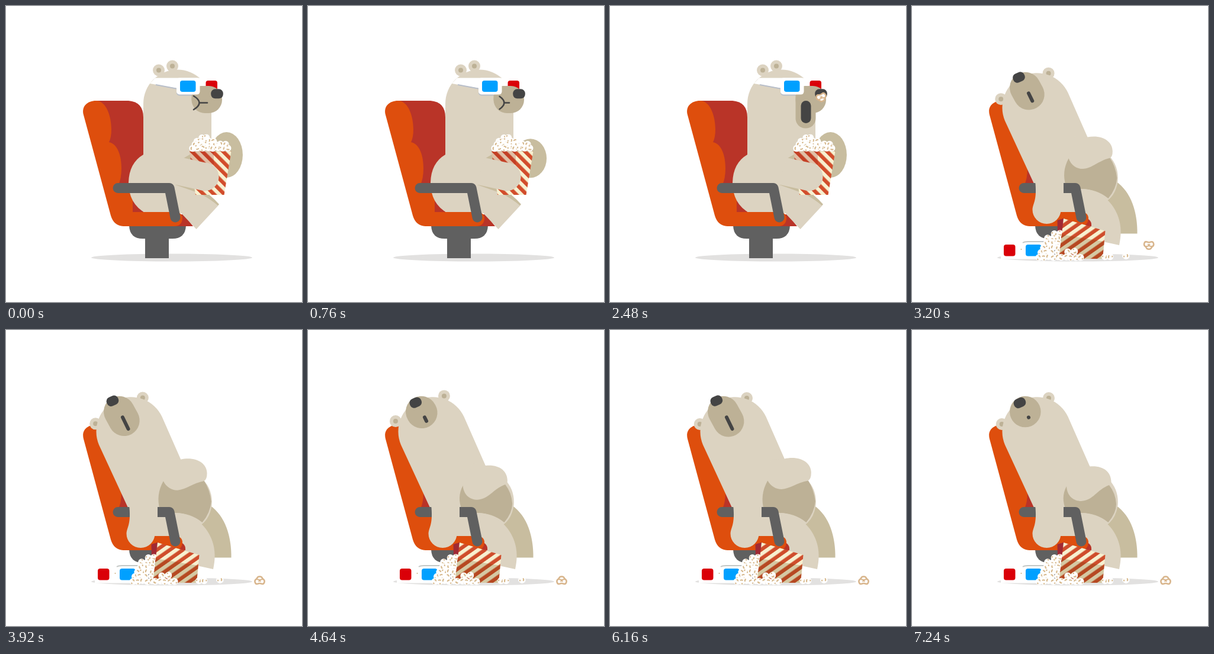
Write an HTML page that moves like this. It is 500x500 px and loops after 7.28 s.

```html
<!DOCTYPE html>
<html lang="en">
<head>
<meta charset="utf-8">
<title>Bear at the movies</title>
<style>
html, body { margin: 0; width: 100%; height: 100%; overflow: hidden; background: #fff; }
svg { display: block; width: 100vw; height: 100vh; }
.fur { fill: #dcd3c1; }
.far { fill: #c8bd9f; }
.dark { fill: #bdb196; }
.red { fill: #b93428; }
.orange { fill: #de4e0d; }
.grey { fill: #606060; }
.ink { fill: #444; }
.arm { fill: none; stroke: #606060; stroke-width: 17; stroke-linecap: round; stroke-linejoin: round; }
.line { fill: none; stroke: #444; stroke-width: 2.6; stroke-linecap: round; }
</style>
</head>
<body>
<svg viewBox="0 0 500 500">
  <defs>
    <pattern id="stripes" width="12.4" height="12.4" patternUnits="userSpaceOnUse" patternTransform="translate(310 246) rotate(-45)">
      <rect width="13" height="13" fill="#f7f0d0"/><rect width="6.3" height="13" fill="#d24d2c"/>
    </pattern>
    <pattern id="tilted" width="12.6" height="12.6" patternUnits="userSpaceOnUse" patternTransform="translate(256 359) rotate(55)">
      <rect width="13" height="13" fill="#cf4d2c"/><rect width="6.3" height="13" fill="#f7f0d0"/>
    </pattern>
    <g id="chair">
      <ellipse cx="280" cy="425" rx="136" ry="6.5" fill="#e2e1e0"/>
      <path class="grey" d="M235 385h40v41h-40zM208 371H304Q303 393 281 393H231Q209 393 208 371Z"/>
      <path class="red" d="M152 160H207Q232 162 232 188V352H180Z"/>
      <path class="orange" d="M152 160C170 160 178 188 178 208Q178 222 174 230C189 233 195 254 195 274Q195 291 190 302L214 308V348H260V372H198Q182 371 177 354L131 184C127 169 138 160 152 160Z"/>
    </g>
    <path id="seat" class="orange" d="M212 348H286Q298 349 298 359Q297 372 284 372H212Z"/>
    <path id="rest" class="arm" d="M189 307.500H276L286 357"/>
    <g id="ear"><circle class="fur" r="10"/><circle class="dark" r="4"/></g>
    <rect id="nose" class="ink" x="-10.300" y="-8" width="20.600" height="16" rx="7.200"/>
    <g id="pretzel" fill="none" stroke="#d8b58c" stroke-width="2.500" stroke-linecap="round">
      <path fill="#fff" d="M0 6.500C-5 7 -3.500 3 -6.200 2C-10 -1 -7.500 -7 -3.500 -5.800Q0 -4 3.500 -5.800C7.500 -7 10 -1 6.200 2C3.500 3 5 7 0 6.500Z"/>
      <path d="M-4.500 1.800Q0 2 1.300 -1.500M4.500 1.800Q0 2 -1.300 -1.500" stroke-width="2"/>
    </g>
  </defs>

  <g id="awake">
    <use href="#chair"/>
    <path class="red" d="M270 352H300L316 372H270Z"/>
    <path class="far" d="M283 301L325 306Q345 318 360 335L350 345Z"/>
    <path class="fur" d="M232 165A57.500 57.500 0 0 1 347 165V290L283 301Q312 311 328 317Q345 326 358 337L360 335.500L321.500 377L296 350H236Q207 334 207 298Q208 265 232 251Z"/>
    <use href="#ear" x="258" y="108.500"/><use href="#ear" x="281" y="101.500"/>
    <path fill="#fff" d="M252 121.500H347V150H327V139H289L243 131Z"/>
    <path d="M253 133L290 140" stroke="#b9bfca" stroke-width="2"/>
    <rect x="288" y="124" width="38.500" height="27.500" rx="5" fill="#b9bfca"/>
    <rect x="288" y="121.500" width="39.500" height="28" rx="5" fill="#fff"/>
    <rect x="337.500" y="126" width="19.500" height="19" rx="4" fill="#da0008"/>
    <path class="fur" d="M326.500 150H347V170H326.500Z"/>
    <rect class="dark" x="313.500" y="135" width="51.500" height="46" rx="22.500"/>
    <rect class="dark" id="jaw" x="313.500" y="135" width="34" rx="16.500"/>
    <path fill="#fff" d="M313 134H327.500V144Q327.500 149.500 322 149.500H313Z"/>
    <rect x="294" y="126" width="26.500" height="19" rx="4" fill="#00a0ff"/>
    <path class="line" id="smile"/>
    <rect class="ink" id="mouth" x="322.500" y="160" width="17" rx="8.500"/>
    <use href="#nose" x="356.500" y="148.300"/>
    <path class="far" d="M300 257L312 250V264Z"/>
    <ellipse class="far" id="hand"/>
    <use href="#pretzel" id="snack"/>
    <path fill="url(#stripes)" d="M310 245.500H380.500L368.500 319H320Z"/>
    <path fill="#8e1010" opacity=".22" d="M310 245.500H351V268H313Z"/>
    <g id="heap"></g>
    <path class="fur" d="M283 301L300 256.500L336 264.500A24 24 0 0 1 335 312.500Z"/>
    <use href="#seat"/><use href="#rest"/>
  </g>

  <g id="asleep">
    <use href="#chair"/>
    <path class="far" d="M344 296C371 314 381 350 380.500 384.500H340L325 310Z"/>
    <use href="#ear" id="earL"/><use href="#ear" id="earR"/>
    <path class="fur" d="M157 194A58.300 58.300 0 0 1 263.500 146.600L302 234L332 252Q350 270 347.500 297Q344 318 331 328L300 348H230L206 300Z"/>
    <path class="dark" id="belly"/>
    <path class="fur" d="M256 348V309H285C323 308 364 348 350 404L318 397L290 368V348Z"/>
    <path class="fur" id="lobe"/>
    <path id="snout" fill="none" stroke="#bdb196" stroke-width="52.500" stroke-linecap="round"/>
    <use href="#nose" id="noseUp"/>
    <path id="snore" fill="none" stroke="#444" stroke-width="6" stroke-linecap="round"/>
    <path class="red" d="M285 360H298Q304 364 303 372H285Z"/>
    <use href="#seat"/><use href="#rest"/>
    <path class="fur" d="M204 290H256V316Q247 330 251.500 344A24 24 0 0 1 203.500 344C204 333 211 330 208.500 300Z"/>
    <path fill="#fff" d="M150 398H222V427.500H150Z"/>
    <rect x="155" y="403" width="19.500" height="19.500" rx="4" fill="#da0008"/>
    <rect x="192" y="403" width="26.500" height="19.500" rx="4" fill="#00a0ff"/>
    <path d="M187 400Q190 398 196 398H226" fill="none" stroke="#c4c8c6" stroke-width="2"/>
    <circle cx="184.500" cy="411" r="1" fill="#cdb083"/>
    <path fill="#a02a34" d="M245.500 362L257 358.500L252 394L246 385Z"/>
    <g id="spillBack"></g>
    <path fill="url(#tilted)" d="M256 359L326.500 380L322 427H248Z"/>
    <path fill="#5a3c00" opacity=".22" d="M253 386L325 398L322 427H248Z"/>
    <g id="spillFront"></g>
    <use href="#pretzel" id="dropped"/>
  </g>
</svg>
<script>
const LOOP = 7280, BITE = 640, NAP = 2560, BREATH = 2360, INHALE = 1060;
const el = id => document.getElementById(id);
const set = (id, attrs) => { for (const k in attrs) el(id).setAttribute(k, attrs[k]); };
const show = (id, on) => el(id).style.display = on ? '' : 'none';
const mix = (a, b, k) => a + (b - a) * k;
const ramp = (t, a, b) => Math.min(1, Math.max(0, (t - a) / (b - a)));
const ease = (t, a, b) => .5 - .5 * Math.cos(Math.PI * ramp(t, a, b));

let seed = 7;
const rnd = () => (seed = seed * 16807 % 2147483647) / 2147483647;

function puff(x, y) {
  const arc = '<path d="M-3 .5Q-2.500 -2.500 .5 -2.500M2 3.200L4 1.500" fill="none" stroke="#d6b88c" stroke-width="2"/>';
  return `<g transform="translate(${x} ${y}) rotate(${rnd() * 360})"><circle r="5.800" fill="#fff"/>${arc}</g>`;
}
// Fills rows of kernels; each row is [y, left, right].
function pile(rows) {
  return rows.map(([y, l, r]) => {
    const n = Math.max(1, Math.round((r - l) / 8.5));
    return Array.from({ length: n + 1 }, (_, i) => puff(mix(l, r, i / n) + rnd() * 2 - 1, y + rnd() * 2 - 1)).join('');
  }).join('');
}
el('heap').innerHTML = pile([[222, 332, 339], [228, 323, 350], [234, 319, 371], [240, 315, 375]]);
el('spillBack').innerHTML = pile([[384, 241, 249], [392, 229, 247], [400, 228, 248], [408, 223, 246], [416, 217, 246], [424, 215, 246]]);
el('spillFront').innerHTML = pile([[415, 263, 275], [424, 253, 284], [423, 325, 335], [422, 361, 361]]);

function eat(t) {
  const u = t % BITE;
  const low = u < 360 ? ease(u, 0, 220) + .25 * ease(u, 250, 350) : 1.25 * (1 - ease(u, 360, 500));
  set('hand', { cx: mix(372.5, 378, low), cy: mix(251.5, 261.5, low), rx: 27.4, ry: mix(38.5, 29, low) });

  const open = ease(u, 400, 510) * (1 - ease(u, 600, 640));
  const chew = .5 - .5 * Math.cos(u / 240 * Math.PI);
  set('jaw', { height: 38 + 33.5 * open });
  set('mouth', { height: 38 * open });
  show('mouth', open > .05);
  show('smile', open <= .05);
  const x = mix(317, 330, chew), mid = mix(326.5, 336, chew), dy = mix(11.5, 10, chew);
  set('smile', { d: `M${x} ${163.5 - dy}Q${2 * mid - x} 163.500 ${x} ${163.5 + dy}M${mid} 163.500H340` });

  let px, py;
  if (u < 400) {
    const k = ease(u, 150, 240);
    px = mix(374, 385, k); py = mix(242, 230, k);
  } else if (u < 560) {
    const k = ramp(u, 400, 560);
    px = mix(385, 357.5, k); py = mix(230, 154.5, 1 - (1 - k) ** 2);
  } else {
    const k = ramp(u, 560, 620);
    px = mix(357.5, 331, k); py = mix(154.5, 180, k * k);
  }
  show('snack', u > 150 && u < 615);
  set('snack', { transform: `translate(${px} ${py}) rotate(${180 + Math.max(0, u - 400)})` });
}

// Falls, bounces twice and rolls to rest.
function dropPretzel(s) {
  const ground = 423;
  const hop = (a, b, h) => 4 * h * ramp(s, a, b) * (1 - ramp(s, a, b));
  const y = mix(160, ground, ramp(s, 0, 470) ** 2) - hop(470, 780, 19) - hop(780, 960, 7);
  const roll = 1 - (1 - ramp(s, 640, 1100)) ** 2, back = ease(s, 1080, 1230);
  const x = mix(360, 400, ramp(s, 0, 640)) + 31 * roll - 2.5 * back;
  const turn = mix(-200, 0, ramp(s, 0, 640)) + 195 * roll - 15 * back;
  set('dropped', { transform: `translate(${x} ${y}) rotate(${turn})` });
}

function sleep(s) {
  const c = s % BREATH;
  const b = c < INHALE ? ease(c, 0, INHALE) : 1 - ease(c, INHALE, BREATH);
  const gape = c < INHALE ? b : 1 - ease(c, BREATH - 720, BREATH);
  const e = s > BREATH + INHALE ? 1 : b;
  set('earL', { transform: `translate(${mix(147.5, 151.7, e)} ${mix(153.5, 159, e)})` });
  set('earR', { transform: `translate(${mix(229.8, 231, e)} ${mix(111, 115, e)})` });
  set('snout', { d: `M191.300 138l${9.3 * b} ${17 * b + .01}` });
  set('noseUp', { transform: `translate(${mix(182, 179.7, b)} ${mix(123, 119.3, b)}) rotate(-24)` });
  set('snore', { d: `M197 147.500l${9.5 * gape} ${19.5 * gape + .01}` });

  const p = (x0, y0, x1, y1) => `${mix(x0, x1, b)} ${mix(y0, y1, b)} `;
  const left = p(261, 264, 266.5, 254), right = p(333, 262, 335, 254);
  set('lobe', { d: `M${left}C${p(262, 281, 272, 263)}${p(273, 289, 281, 268)}${p(286, 289, 290, 268)}`
    + `C${p(306, 288, 304, 267)}${p(312, 270, 316, 257)}${right}`
    + `Q${p(336.5, 262, 340, 251)}${p(336.5, 256, 340, 240)}C${p(336, 240, 340, 222)}${p(324, 229, 319, 211)}${p(301, 230.5, 294, 217)}`
    + `L${p(280, 226, 272, 218)}Z` });
  set('belly', { d: `M${left}Q${p(251, 283, 253, 278)}260 304L285 309Q312 309 331.500 325Q345 309 ${p(345, 294, 347, 289)}`
    + `Q${p(344, 276, 344, 268)}${right}L${p(300, 250, 300, 245)}Z` });
  dropPretzel(s);
}

function draw(now) {
  const t = now % LOOP, nap = t >= NAP;
  show('awake', !nap);
  show('asleep', nap);
  nap ? sleep(t - NAP) : eat(t);
}

const start = performance.now();
function tick() {
  draw(performance.now() - start);
  requestAnimationFrame(tick);
}
tick();
</script>
</body>
</html>
```
